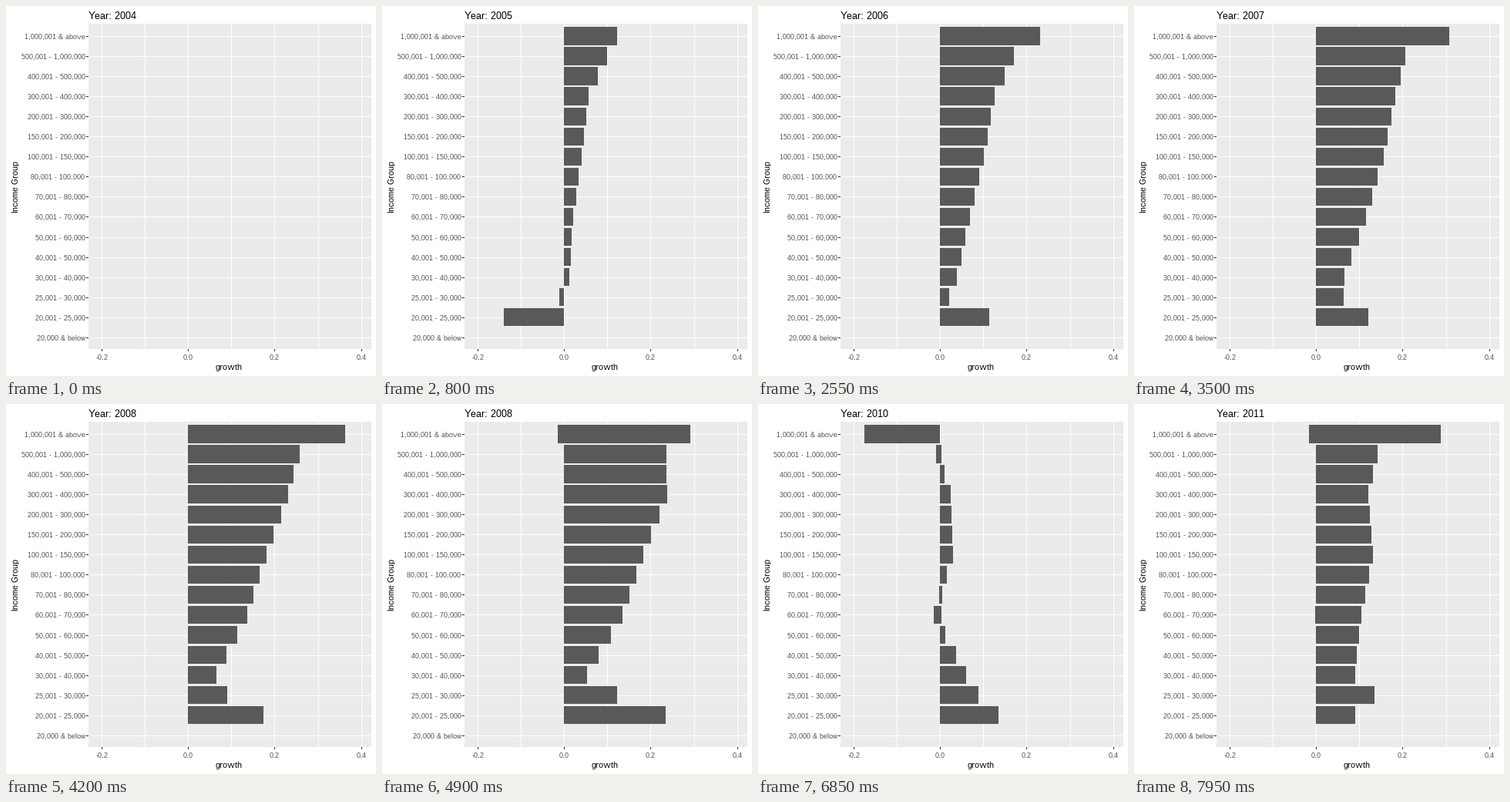
A matplotlib script that plays this animation: 480 px wide and 480 px high, repeating every 8000 ms.

```python
import numpy as np
import matplotlib.pyplot as plt
from matplotlib.animation import FuncAnimation
from matplotlib.patches import Rectangle

SIZE, DPI = 480, 100
FRAMES, INTERVAL, STEP = 160, 50, 23
LEFT, TOP, RIGHT, BOTTOM = 107, 23, 474, 445
ZERO, UNIT = 236, 562
PITCH = (BOTTOM - TOP) / 16.2

# Income brackets in thousands
BOUNDS = [20, 25, *range(30, 81, 10), 100, 150, *range(200, 501, 100), 1000]
GROUPS = (["20,000 & below"]
          + [f"{a},001 - {b * 1000:,}" for a, b in zip(BOUNDS, BOUNDS[1:])]
          + ["1,000,001 & above"])[::-1]

# Growth in thousandths at a few rows, 2004 to 2011; rows between are blended
KEY_ROWS = [0, 1, 3, 6, 9, 12, 13, 14]
KEY_GROWTH = [
    [0] * 8,
    [177, 144, 83, 58, 31, 18, -15, -200],
    [212, 162, 112, 86, 56, 32, 9, 114],
    [304, 203, 180, 155, 114, 66, 62, 117],
    [394, 286, 259, 195, 149, 66, 106, 206],
    [-55, 96, 180, 149, 95, 17, 171, 315],
    [-180, -9, 18, 25, -15, 62, 85, 127],
    [316, 156, 131, 142, 115, 93, 140, 87],
]
ROWS = np.arange(15)
GROWTH = np.array([np.interp(ROWS, KEY_ROWS, g) for g in KEY_GROWTH]) / 1000
LOWS, HIGHS = np.minimum(GROWTH, 0), np.maximum(GROWTH, 0)

plt.rcParams.update({"font.family": "Liberation Sans",
                     "text.hinting": "native", "text.hinting_factor": 1})
fig = plt.figure(figsize=(SIZE / DPI, SIZE / DPI), dpi=DPI, facecolor="white")
ax = fig.add_axes([0, 0, 1, 1])
ax.set_xlim(0, SIZE)
ax.set_ylim(SIZE, 0)
ax.axis("off")


def box(x, y, w, h, color):
    return ax.add_patch(Rectangle((x, y), w, h, facecolor=color,
                                  linewidth=0, antialiased=False))


def label(x, y, text, px, color="black", **kw):
    return ax.text(x, y, text, fontsize=px * 72 / DPI, color=color,
                   va="baseline", **kw)


def row_y(i):
    return TOP + 0.42 + PITCH * (0.6 + i)


box(LEFT, TOP, RIGHT - LEFT, BOTTOM - TOP, "#ebebeb")
for k in range(-2, 5):
    x = round(ZERO + k * UNIT / 10)
    box(x, TOP, 1, BOTTOM - TOP, "white")
    if k % 2 == 0:
        box(x, BOTTOM, 1, 3, "#333333")
        label(x + 0.5, 459, f"{k / 10:.1f}", 9, "#4d4d4d", ha="center")
for i, name in enumerate(GROUPS):
    y = round(row_y(i))
    box(LEFT, y, RIGHT - LEFT, 1, "white")
    box(LEFT - 3, y, 3, 1, "#333333")
    label(102.5, y + 4, name, 9, "#4d4d4d", ha="right")

label(289.5, 472, "growth", 11, ha="center")
label(16, 234, "Income Group", 11, ha="center", rotation=90,
      rotation_mode="anchor")
title = label(107, 17, "", 13)

bars = []
for i in ROWS:
    y0, y1 = (round(row_y(i) + s * 0.45 * PITCH) for s in (-1, 1))
    bars.append(box(ZERO, y0, 0, y1 - y0, "#595959"))


def blend(ends, n):
    k, part = divmod(n, STEP)
    t = part / STEP
    return np.rint(ZERO + UNIT * (ends[k] * (1 - t) + ends[k + 1] * t))


def draw(n):
    for bar, a, b in zip(bars, blend(LOWS, n), blend(HIGHS, n)):
        bar.set_x(a)
        bar.set_width(b - a)
        bar.set_visible(b > a)
    title.set_text(f"Year: {2004 + (2 * n + STEP) // (2 * STEP)}")
    return bars + [title]


anim = FuncAnimation(fig, draw, frames=FRAMES, interval=INTERVAL,
                     repeat=True, repeat_delay=0, blit=False)
plt.show()
```
